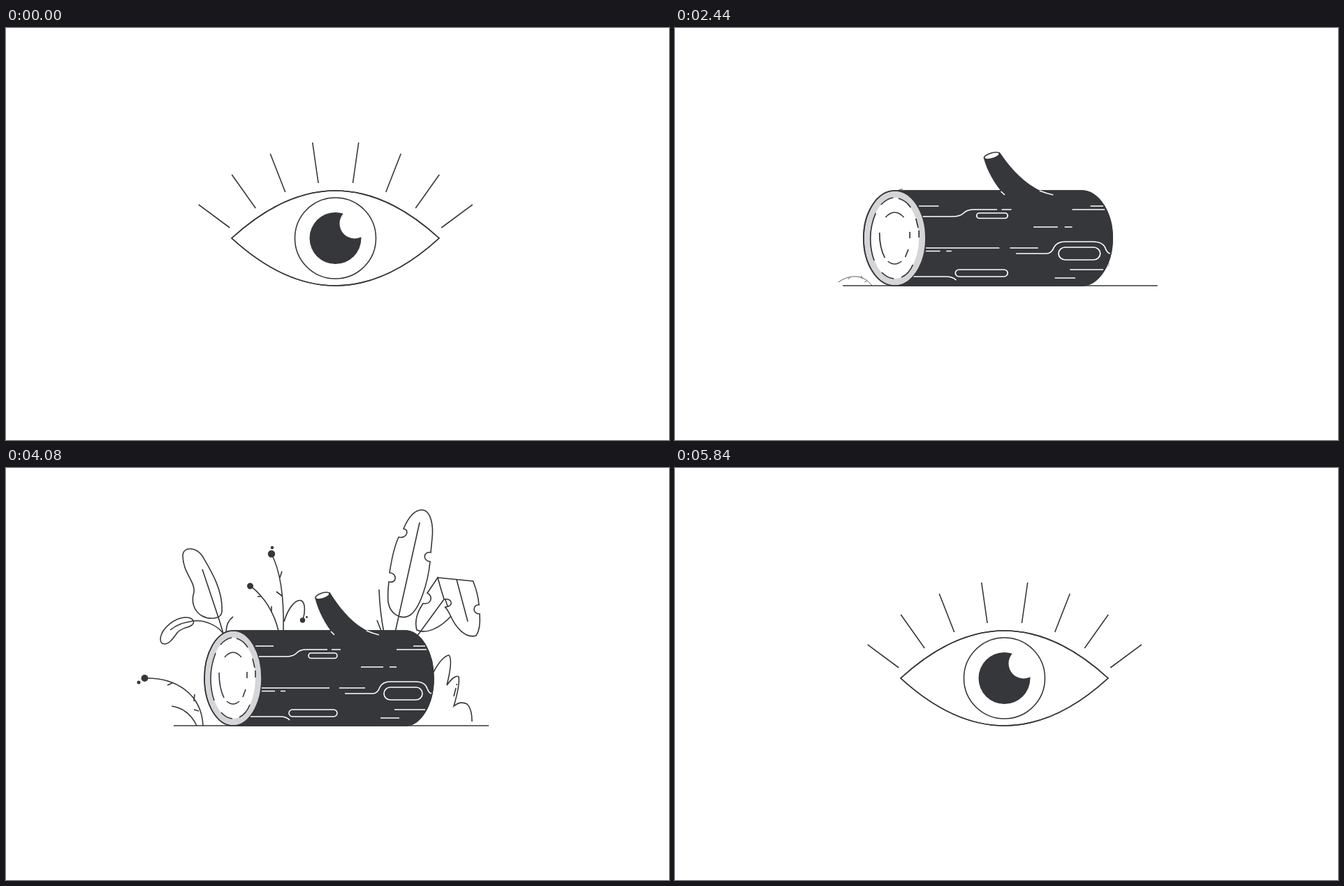
Recreate the animation shown at these times as an HTML page. Size 949 px wide and 590 px high, loop 5.88 s.

```html
<!DOCTYPE html>
<html>
<head>
<meta charset="utf-8">
<style>
html, body { margin: 0; width: 100%; height: 100%; overflow: hidden; background: #fff; }
svg { display: block; }
path, ellipse, circle, rect { fill: none; stroke: #36373b; stroke-width: 1.6; }
.leaf { fill: #fff; }
.dot, .dark { fill: #36373b; stroke: none; }
#grain path, #grain rect, .cut { stroke: #fff; }
</style>
</head>
<body>
<svg width="949" height="590" viewBox="0 0 949 590">
  <clipPath id="clip"><path id="clipShape"/></clipPath>
  <g id="plants"></g>
  <path id="sag"/>
  <path id="ground" d="M240 369H691"/>
  <g id="log">
    <path id="body"/>
    <g clip-path="url(#clip)">
      <ellipse id="iris"/>
      <g id="pupil">
        <circle class="dot" r="37"/>
        <circle cx="27.5" cy="-21" r="21.5" style="fill:#fff;stroke:none"/>
      </g>
      <g id="rings">
        <ellipse class="leaf" rx="32" ry="58" style="stroke:none"/>
        <path d="M32-11V-1M20-9V0M-25-36Q-32-18-32 0Q-32 18-27 32M-17 49Q-10 57-1 58M9 56Q19 51 24 38M-18-48Q-10-57-2-58M5-57Q15-54 21-44M28-28L31-15"/>
        <path d="M-12-30Q0-44 12-30M-20-8Q-20 14-13 28M-9 33Q0 41 9 33M14 27L18 16"/>
      </g>
    </g>
    <path id="lids"/>
    <g id="grain">
      <path d="M357 255H383M362 270H401Q411 270 416 265Q420 260 430 260H460M466 260H479M508 285H540M549 285H559M366 315H463M477 315H514M366 319.5H385M393 319.5H400M485 323H525Q532 323 535 314Q539 306 550 306H586Q600 306 603 316Q605 322 609 323M350 356H392Q402 356 406 361M536 358H563M556 346H600M559 260H602M583 255H600"/>
      <rect x="433" y="265" width="41" height="7.5" rx="3.7"/>
      <rect x="541" y="314" width="55" height="18" rx="9"/>
      <rect x="405" y="346" width="69" height="10" rx="5"/>
    </g>
    <g id="branch">
      <path class="dark" d="M442.500 187C447 205 457 224 470 240H534C505 232 482 208 463.500 178Z"/>
      <ellipse class="leaf" cx="453" cy="183" rx="10.500" ry="4" transform="rotate(-18 453 183)"/>
      <path class="cut" d="M465 234L470 239M516 233Q525 237 534 239"/>
    </g>
  </g>
  <path id="lashes"/>
</svg>
<script>
const LOOP = 5880;
const $ = id => document.getElementById(id);
const clamp = x => Math.max(0, Math.min(1, x));
const span = (t, a, b) => clamp((t - a) / (b - a));
const ease = (t, a, b) => {
  const p = span(t, a, b);
  return p < .5 ? 4 * p ** 3 : 1 - 4 * (1 - p) ** 3;
};
const mix = (a, b, k) => a + (b - a) * k;
const grey = (a, b, k) => `rgb(${a.map((v, i) => Math.round(mix(v, b[i], k)))})`;
const WHITE = [255, 255, 255], DARK = [54, 55, 59], RING = [213, 213, 216];

const line = d => `<path d="${d}"/>`;
const leaf = d => `<path class="leaf" d="${d}"/>`;
const dot = (x, y, r) => `<circle class="dot" cx="${x}" cy="${y}" r="${r}"/>`;

// root x, root y, start time, turn while growing, drawing
const plants = [
  [612, 330, 2400, 30, line('M612 292Q624 270 634 268Q640 275 631 311Q643 295 648 299Q650 310 641 341Q650 333 660 338Q667 345 667 363M644 315L641 327M645.500 309L645 311')],
  [311, 237, 2880, -60,
    leaf('M253 125C254 112 272 113 281 126C294 148 311 176 309 206C308 217 290 217 281 212C268 205 265 190 269 178C271 162 253 150 253 125Z') +
    line('M281 145L305 217L311 237')],
  [311, 237, 2920, -40,
    leaf('M221 244C223 229 243 213 259 214C270 215 270 222 266 225C259 230 252 228 245 236C238 246 233 252 227 252C222 252 221 249 221 244Z') +
    line('M235 232C247 222 258 221 268 219C285 217 303 226 311 237')],
  [315, 237, 2340, 60, line('M315 236Q315 220 325 213')],
  [282, 369, 2350, -50, line('M282 369C280 325 245 300 199 301M238 308L231 311M269 334L270 324M276 348L269 346')],
  [198.5, 301, 2900, 0, dot(198.5, 301, 5) + dot(190, 307, 2.5)],
  [273, 369, 2715, 20, line('M273 369Q262 345 237 341')],
  [390, 233, 2535, 145, line('M390 233Q380 193 350 169M366 184H360M380 207V198') + dot(349.5, 169, 4.5)],
  [397, 233, 2726, 172, line('M397 233C398 190 394 150 380 123M392 157L395 148M396 184L387 177') + dot(380, 123, 5.2) + dot(381, 114, 2.2)],
  [398, 233, 2900, 80, line('M398 220C404 200 415 187 423 190C429 194 428 208 425 217') + dot(424.5, 218, 3.7) + dot(430.5, 213.5, 1.5)],
  [539, 233, 2900, 40, line('M540.500 233Q535 205 534 174M537 233L531 218')],
  [558, 233, 2880, 150,
    leaf('M595 60C608 60 612 82 610 100L608 121C597 119 596 133 607 134C604 165 592 202 578 211C566 218 550 210 547 192C546 180 547 172 548 163C560 166 560 150 549 150C552 130 556 112 562 99C574 102 578 88 569 87C575 73 583 60 595 60Z') +
    line('M592 78L557.500 233')],
  [589, 240, 2663, 141,
    leaf('M618 157L603 179C612 183 609 196 597 194C588 207 585 221 588 232C600 238 620 231 637 212Z') +
    leaf('M618 157L668.500 162C673 173 676 184 677 196C668 195 667 209 678 209C679 222 677 234 673 240C657 245 643 227 636 211C632 203 630 200 628 199C640 200 641 186 627 188Q622 172 618 157Z') +
    line('M645 160L661 220M627 188L589 240')]
];
const nodes = plants.map(p => {
  const g = document.createElementNS('http://www.w3.org/2000/svg', 'g');
  g.innerHTML = p[4];
  return $('plants').appendChild(g);
});

// outer and inner ends of the left lashes, from the eye's centre
const lashes = [[-196, -48, -151.5, -15], [-148.5, -91, -114.5, -43], [-93.5, -121, -72, -66], [-33, -137, -24.7, -79]];

function drawPlants(t) {
  plants.forEach(([x, y, start, turn], i) => {
    const rest = 1 - span(t, start, start + 500);
    const out = span(t, 4240 + i * 8, 4640 + i * 8);
    const size = (1 - rest ** 3) * Math.max(0, 1 - 3.6 * out ** 3 + 2.6 * out ** 2);
    const sway = 1.1 * Math.sin((t - 4080) / 280) * (1 - rest);
    const g = nodes[i];
    g.style.display = size > .001 ? '' : 'none';
    g.setAttribute('transform', `translate(${x} ${y}) rotate(${turn * rest ** 2 + sway}) scale(${size}) translate(${-x} ${-y})`);
  });
  const depth = 40 * Math.sin(Math.PI * span(t, 2700, 2904));
  $('sag').setAttribute('d', depth > .5 ? `M523 370Q578 ${369 + 2 * depth} 637 368` : '');
  const w = ease(t, 2180, 2460) - ease(t, 4360, 4680);
  $('ground').setAttribute('d', w > .01 ? `M${465.5 - 225.5 * w} 369H${465.5 + 225.5 * w}` : '');
}

function drawEye(t) {
  const right = ease(t, 100, 500) - ease(t, 1000, 1370);
  const left = ease(t, 4600, 5010) - ease(t, 5400, 5790);
  const k = ease(t, 2080, 2440) - ease(t, 4480, 4840);
  const dx = 70 * right - 93 * left, dy = 30.5 * right + 84 * left;
  const blink = [200, 1160, 5017, 5480].reduce((b, s) => b + Math.sin(Math.PI * span(t, s, s + 300)) ** 2, 0);
  const up = 1 - 4 / 3 * blink, low = (1 + up) / 2;

  // outline shared by the lids and the log
  const c = mix(471.5, 448, k), half = mix(148.5, 164, k), flat = 123 * k;
  const p1 = half - mix(49.5, 0, k), p2 = flat + mix(49.5, 22.6, k), h = mix(45.3, 37.6, k);
  const pt = (x, y) => `${c + x} ${301 + y * (y < 0 ? up : low)} `;
  const shape = 'M' + pt(-half, 0) +
    'C' + pt(-p1, -h) + pt(-p2, -68) + pt(-flat, -68) + 'L' + pt(flat, -68) +
    'C' + pt(p2, -68) + pt(p1, -h) + pt(half, 0) +
    'C' + pt(p1, h) + pt(p2, 68) + pt(flat, 68) + 'L' + pt(-flat, 68) +
    'C' + pt(-p2, 68) + pt(-p1, h) + pt(-half, 0) + 'Z';
  for (const id of ['body', 'clipShape', 'lids']) $(id).setAttribute('d', shape);
  $('body').style.fill = grey(WHITE, DARK, k);

  const wobble = t > 2080 ? .09 * k * Math.exp(-Math.max(0, t - 2480) / 200) * Math.cos(Math.PI * (t - 2480) / 400) : 0;
  $('log').setAttribute('transform', `translate(${dx + 448} ${dy}) scale(${1 + wobble} 1) translate(-448 0)`);

  const ix = mix(471.5 + 86 * right - 86.5 * left, 325, k);
  const iy = mix(301 + 8.5 * right + 37 * left, 301, k);
  const iris = $('iris');
  iris.setAttribute('cx', ix);
  iris.setAttribute('cy', iy);
  iris.setAttribute('rx', mix(58, 41, k));
  iris.setAttribute('ry', mix(58, 68, k));
  iris.style.fill = grey(WHITE, RING, k);
  $('pupil').setAttribute('transform', `translate(${ix} ${iy}) scale(${1 - k})`);
  $('rings').setAttribute('transform', `translate(${ix} ${iy}) scale(${k})`);
  $('grain').setAttribute('transform', `translate(448 0) scale(${k} 1) translate(-448 0)`);
  $('branch').setAttribute('transform', `translate(500 240) scale(${k}) translate(-500 -240)`);
  for (const id of ['rings', 'grain', 'branch']) $(id).style.display = k > .01 ? '' : 'none';

  // lashes retract outwards, and come back from a wider ring
  const q = ease(t, 2060, 2300) - ease(t, 4640, 4940);
  const spread = t > 4000 ? 1 + .5 * q : 1;
  let d = '';
  if (q < .99) for (const [ox, oy, nx, ny] of lashes) for (const side of [1, -1]) {
    const x = ox * spread, y = oy * spread;
    d += `M${471.75 + dx + side * x} ${301 + dy + y * up}L${471.75 + dx + side * mix(nx, x, q)} ${301 + dy + mix(ny, y, q) * up}`;
  }
  $('lashes').setAttribute('d', d);
}

function frame(now) {
  const t = now % LOOP;
  drawPlants(t);
  drawEye(t);
  requestAnimationFrame(frame);
}
frame(0);
</script>
</body>
</html>
```
